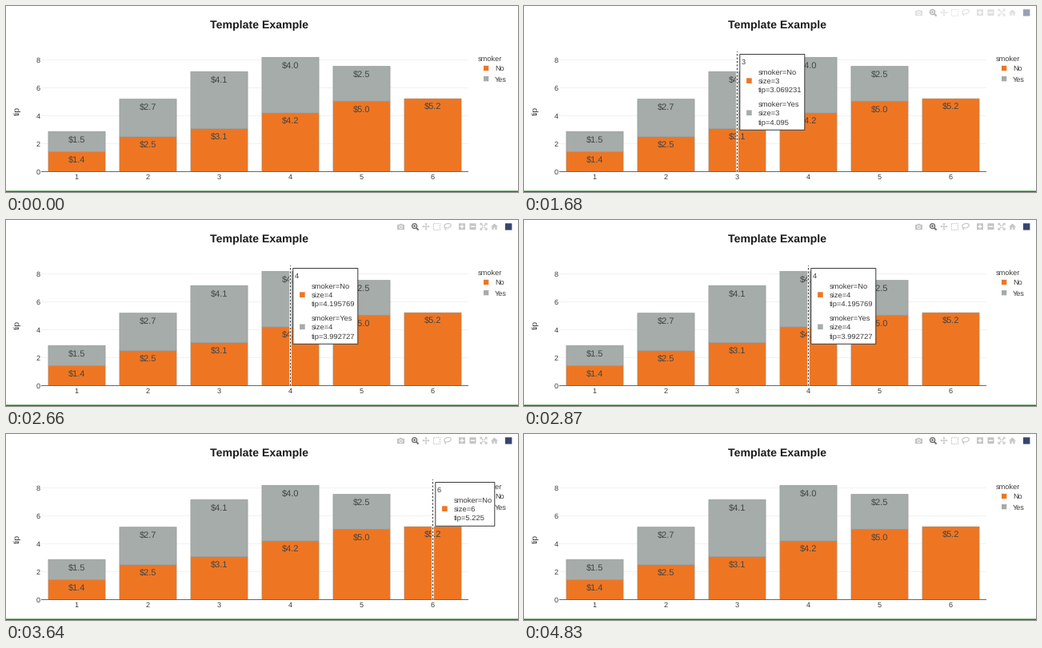
A matplotlib script that plays this animation: 640x233 px, repeating every 5180 ms.

```python
import matplotlib.pyplot as plt
from matplotlib.animation import FuncAnimation
from matplotlib.patches import Circle, Ellipse, Polygon, Rectangle

W, H, DPI = 640, 233, 100
PX = 72 / DPI
STEP, FRAMES = 70, 74

ORANGE, GRAY, INK = "#ee7623", "#a5acaa", "#3a3a3a"
ICON, ACTIVE, LOGO = "#c4c4c4", "#6e6e6e", "#36466e"

NO = [1.415, 2.489, 3.069231, 4.195769, 5.046667, 5.225]
YES = [1.46, 2.709, 4.095, 3.992727, 2.5, None]
LEFT, RIGHT, BASE, TOP = 44, 578, 207.5, 57
SLOT = (RIGHT - LEFT) / 6
UNIT = 17.5

plt.rcParams.update({"font.family": "Liberation Sans", "path.snap": False,
                     "text.hinting": "none"})
fig = plt.figure(figsize=(W / DPI, H / DPI), dpi=DPI, facecolor="white")
ax = fig.add_axes([0, 0, 1, 1])
ax.set_xlim(0, W)
ax.set_ylim(H, 0)
ax.axis("off")


def rect(x0, y0, x1, y1, color, z=1, edge="none", lw=0):
    return ax.add_patch(Rectangle((x0, y0), x1 - x0, y1 - y0, facecolor=color,
                                  edgecolor=edge, lw=lw * PX, zorder=z))


def line(xs, ys, color, width=1, z=1, **kw):
    kw.setdefault("solid_capstyle", "butt")
    return ax.plot(xs, ys, color=color, lw=width * PX, zorder=z, **kw)[0]


def label(x, y, s, size, ha="left", z=3, color=INK, **kw):
    """Text whose capitals are centred vertically on y."""
    return ax.text(x, y + 0.36 * size, s, fontsize=size * PX, ha=ha,
                   va="baseline", color=color, zorder=z, **kw)


def center(i):
    return LEFT + SLOT * (i + 0.5)


def height(v):
    return BASE - UNIT * v


def draw_chart():
    label(316.7, 23.2, "Template Example", 14.1, "center", color="#1c1c1c",
          weight="bold")
    for v in range(0, 9, 2):
        if v:
            line([LEFT, RIGHT], [height(v)] * 2, "#f2f2f2")
        label(43, height(v), str(v), 9.2, "right")
    for i, (no, yes) in enumerate(zip(NO, YES)):
        x, half = center(i), SLOT * 0.4
        low = 0
        for v, color in ((no, ORANGE), (yes, GRAY)):
            if v is None:
                continue
            top = height(low + v)
            rect(x - half, top, x + half, height(low), color, 2, "#8f8f8f", 0.5)
            label(x - 0.4, top + 8.7, f"${v:.1f}", 11, "center",
                  color="#444444")
            low += v
        label(x - 0.6, 213.6, str(i + 1), 9.2, "center")
    line([LEFT, RIGHT], [BASE] * 2, "#666666", z=2.5)
    ax.text(14.6, 131, "tip", fontsize=10.5 * PX, rotation=90, ha="center",
            va="center", color=INK)
    label(590, 65.5, "smoker", 9.3)
    for y, name, color in ((78, "No", ORANGE), (91.2, "Yes", GRAY)):
        rect(597, y - 3.2, 603.3, y + 3.1, color)
        label(611, y - 0.1, name, 9.2)
    rect(0, 231.5, W, H, "#0c860c")


def draw_hover(i, width):
    x = center(i)
    items = [("No", NO[i], ORANGE)]
    if YES[i] is not None:
        items.append(("Yes", YES[i], GRAY))
    parts = [
        line([x, x], [BASE, TOP], "white", 2.6, 4),
        line([x, x], [BASE, TOP], INK, 1.1, 5, linestyle=(0, (2, 2)),
             dash_capstyle="butt"),
        rect(x + 3.3, 60.5, x + 3.3 + width, 115.3 + 40 * (len(items) - 1),
             "white", 6, INK, 1),
        label(x + 4.8, 69.3, str(i + 1), 9.2, z=7),
    ]
    for k, (name, v, color) in enumerate(items):
        y = 93.6 + 40.2 * k
        parts.append(rect(x + 11.6, y - 3.3, x + 18.2, y + 3.3, color, 7))
        rows = f"smoker={name}", f"size={i + 1}", f"tip={v:.7g}"
        for r, s in enumerate(rows):
            parts.append(label(x + 26.3, y + 0.2 + 11.3 * (r - 1), s, 9.4, z=7))
    return parts


def draw_toolbar():
    y = 8.2
    # camera
    rect(489, 5.8, 498, 12.2, ICON)
    rect(491.7, 4.8, 495.3, 6, ICON)
    ax.add_patch(Circle((493.5, 8.9), 2.2, color="white", lw=0, zorder=2))
    ax.add_patch(Circle((493.5, 8.9), 1.3, color=ICON, lw=0, zorder=3))
    # zoom
    ax.add_patch(Circle((510.6, 7.6), 3, fill=False, ec=ACTIVE, lw=1.4 * PX))
    line([512.8, 515.6], [9.8, 12.6], ACTIVE, 1.9)
    line([509, 512.2], [7.6, 7.6], ACTIVE)
    line([510.6, 510.6], [6, 9.2], ACTIVE)
    # pan
    line([521, 529], [y, y], ICON)
    line([525, 525], [y - 4, y + 4], ICON)
    for dx, dy in ((1, 0), (-1, 0), (0, 1), (0, -1)):
        tip = (525 + 4.6 * dx, y + 4.6 * dy)
        bx, by = 525 + 2.6 * dx, y + 2.6 * dy
        ax.add_patch(Polygon([tip, (bx + 1.6 * dy, by + 1.6 * dx),
                              (bx - 1.6 * dy, by - 1.6 * dx)], color=ICON, lw=0))
    # box select
    line([534.5, 542.5, 542.5, 534.5, 534.5], [4.5, 4.5, 12.5, 12.5, 4.5],
         ICON, 1, linestyle=(0, (1.5, 1)), dash_capstyle="butt")
    # lasso
    ax.add_patch(Ellipse((552, 7.2), 8.6, 5.4, angle=-12, fill=False,
                         ec=ICON, lw=1.1 * PX))
    line([549.2, 548.6, 550.2], [9, 10.8, 12.6], ICON, 1.1)
    # zoom in and out
    for x in (570, 583.5):
        rect(x - 4, y - 4, x + 4, y + 4, ICON)
        line([x - 2.6, x + 2.6], [y, y], "white", 1.4, 2)
    line([570, 570], [y - 2.6, y + 2.6], "white", 1.4, 2)
    # autoscale
    for sx in (-1, 1):
        for sy in (-1, 1):
            x1, y1 = 597 + 4 * sx, y + 4 * sy
            line([x1 - 2.4 * sx, x1, x1], [y1, y1, y1 - 2.4 * sy], ICON, 1)
            line([597 + 0.6 * sx, x1], [y + 0.6 * sy, y1], ICON, 1.2)
    # home
    ax.add_patch(Polygon([(606, 8.6), (610.5, 4.4), (615, 8.6)],
                         color=ICON, lw=0))
    rect(607.4, 8.4, 613.6, 12.2, ICON)
    rect(609.6, 9.6, 611.4, 12.2, "white", 2)
    rect(624, 4.2, 632.4, 12.6, LOGO)
    return rect(480, 1, W, 15, "white", 8)


draw_chart()
cover = draw_toolbar()
hovers = {i: draw_hover(i, w) for i, w in ((2, 81), (3, 81), (4, 82), (5, 74))}

# start time in ms and the hovered bar
SCHEDULE = [(0, None), (1680, 2), (2660, 3), (3150, 4), (3640, 5), (4550, None)]
FADE_START, FADE_TIME = 1540, 350


def update(n):
    t = n * STEP
    current = [bar for start, bar in SCHEDULE if t >= start][-1]
    for i, parts in hovers.items():
        for p in parts:
            p.set_visible(i == current)
    u = min((t - FADE_START) / FADE_TIME, 1)
    shown = 1 - (1 - u) ** 1.4 if t >= 1680 else 0
    cover.set_alpha(1 - shown)
    return []


anim = FuncAnimation(fig, update, frames=FRAMES, interval=STEP, repeat=True,
                     repeat_delay=0, blit=False)
plt.show()
```
